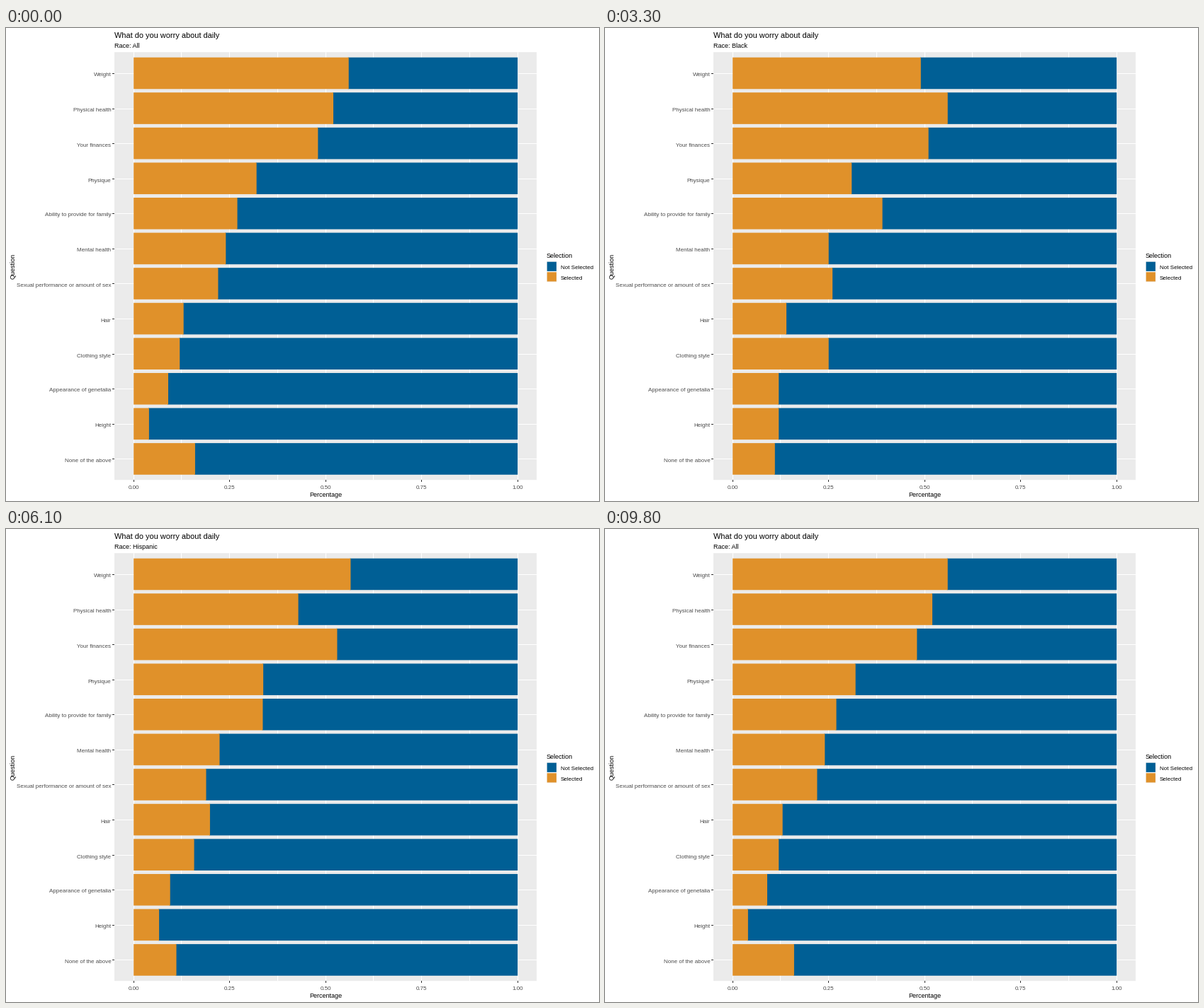
These frames come from a looping animation (837x669 px, 10 s). A matplotlib script:

```python
import matplotlib.pyplot as plt
import numpy as np
from matplotlib.animation import FuncAnimation
from matplotlib.patches import Rectangle

W, H, DPI = 837, 669, 64
BLUE, ORANGE, PANEL = "#005f95", "#e0912a", "#ebebeb"
LEFT, TOP, RIGHT, BOTTOM = 153, 34.2, 749, 639.2
X0, SPAN = 180.2, 542
STEP = (BOTTOM - TOP) / 12.2
HALF = 0.45 * STEP
KEY, INSET = 14.6, 0.7

GROUPS = ["All", "Asian", "Black", "Hispanic", "Other", "White"]
# percent selected in each group after "All"
SURVEY = {
    "Weight": (44, 49, 61, 49, 57),
    "Physical health": (69, 56, 41, 46, 52),
    "Your finances": (61, 51, 56, 48, 47),
    "Physique": (36, 31, 42, 20, 32),
    "Ability to provide for family": (42, 39, 37, 28, 26),
    "Mental health": (36, 25, 28, 13, 24),
    "Sexual performance or amount of sex": (28, 26, 17, 22, 22),
    "Hair": (28, 14, 24, 13, 12),
    "Clothing style": (28, 25, 18, 12, 11),
    "Appearance of genetalia": (11, 12, 14, 2, 9),
    "Height": (8, 12, 7, 6, 3),
    "None of the above": (3, 11, 7, 18, 17),
}
by_group = np.array(list(SURVEY.values())).T
# "All" is the mean weighted by group size
overall = np.round(0.03 * by_group[:4].sum(axis=0) + 0.88 * by_group[4])
shares = np.vstack([overall, by_group]) / 100

plt.rcParams["font.family"] = "Liberation Sans"
fig = plt.figure(figsize=(W / DPI, H / DPI), dpi=DPI, facecolor="white")
ax = fig.add_axes([0, 0, 1, 1])
ax.set(xlim=(0, W), ylim=(H, 0))
ax.axis("off")


def box(x, y, w, h, color):
    return ax.add_patch(Rectangle((x, y), w, h, fc=color, lw=0, snap=False))


def label(x, y, s, px, color="black", ha="left", va="baseline", rotation=0):
    return ax.text(x, y, s, fontsize=px * 72 / DPI, color=color, ha=ha,
                   va=va, rotation=rotation)


box(LEFT, TOP, RIGHT - LEFT, BOTTOM - TOP, PANEL)
for k in range(9):
    x = int(X0 + SPAN * k / 8)
    box(x, TOP, 1, BOTTOM - TOP, "white")
    if k % 2 == 0:
        box(x, 639, 1, 3, "#333333")
        label(x + 0.5, 651.5, f"{k / 8:.2f}", 8, "#4d4d4d", "center")

blues, oranges = [], []
for i, topic in enumerate(SURVEY):
    mid = TOP + STEP * (0.6 + i)
    y = round(mid)
    box(LEFT, y, RIGHT - LEFT, 1, "white")
    box(LEFT - 3, y, 3, 1, "#333333")
    label(148.5, y + 4.5, topic, 8, "#4d4d4d", "right")
    blues.append(box(X0, mid - HALF, SPAN, 2 * HALF, BLUE))
    oranges.append(box(X0, mid - HALF, 0, 2 * HALF, ORANGE))

label(153, 14.5, "What do you worry about daily", 11)
subtitle = label(153, 28.5, "", 9)
label(451, 663, "Percentage", 9, ha="center")
label(14.5, 337, "Question", 9, ha="right", va="center", rotation=90)

label(763, 325, "Selection", 9)
for i, (color, name) in enumerate([(BLUE, "Not Selected"),
                                   (ORANGE, "Selected")]):
    y = 330 + KEY * i
    box(763, y, KEY, KEY, "#f2f2f2")
    box(763 + INSET, y + INSET, KEY - 2 * INSET, KEY - 2 * INSET, color)
    label(783, y + 11, name, 8)


def pose(frame):
    """Current group, next group and progress between them."""
    now, t = 0, 0
    for i in range(len(GROUPS)):
        start = int(8.9 + 16.6 * i)
        end = min(start + 8, 98)
        if frame >= start:
            now, t = i, min(1, (frame - start) / (end - start))
    return now, (now + 1) % len(GROUPS), t


def draw(frame):
    now, then, t = pose(frame)
    widths = SPAN * (shares[now] + (shares[then] - shares[now]) * t)
    for blue, orange, w in zip(blues, oranges, widths):
        orange.set_width(w)
        # one pixel of overlap hides the seam
        blue.set_x(X0 + w - 1)
        blue.set_width(SPAN - w + 1)
    subtitle.set_text("Race: " + GROUPS[then if t > 0.5 else now])
    return [*blues, *oranges, subtitle]


anim = FuncAnimation(fig, draw, frames=100, interval=100, repeat=True,
                     repeat_delay=0, blit=False)
plt.show()
```
